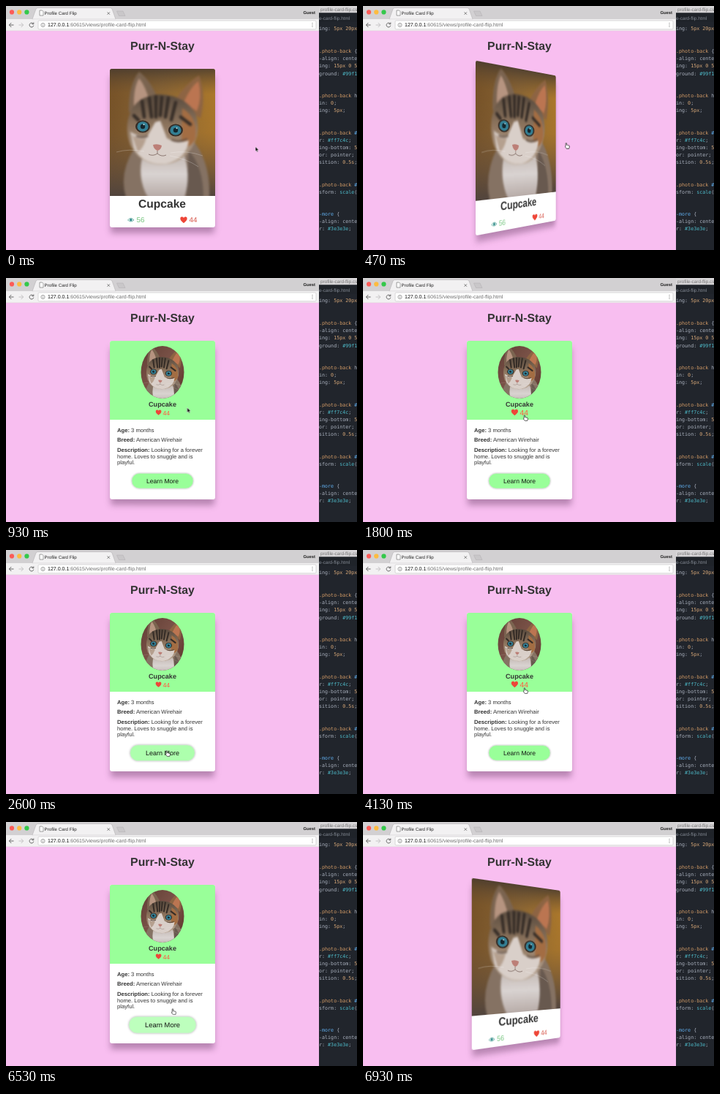
Animation, 480 px wide and 334 px high, one loop 6.99 s. Source, as an HTML page:

```html
<!DOCTYPE html>
<html lang="en">
<head>
<meta charset="utf-8">
<title>Profile Card Flip</title>
<style>
  :root { --loop: 6990ms; }
  html, body { margin: 0; width: 100%; height: 100%; overflow: hidden; }
  body { position: relative; background: #f8bef0; font-family: "Liberation Sans", sans-serif; }
  svg { position: absolute; display: block; text-rendering: geometricPrecision; }
  svg text { white-space: pre; }
  .window { left: 0; top: 0; }
  .code { font: 6.7px "DejaVu Sans Mono", monospace; fill: #abb2bf; }
  .sel { fill: #d19a66; }
  .val { fill: #d8a878; }
  .fn { fill: #4fbccb; }
  .id { fill: #61afef; }

  .scene { position: absolute; left: 142px; top: 86px; width: 144px; height: 217px; perspective: 500px; }
  .card { position: absolute; inset: 0; transform-style: preserve-3d; animation: flip var(--loop) infinite; }
  .face {
    inset: 0; border-radius: 3px; background: #fff; overflow: hidden; backface-visibility: hidden;
    box-shadow: 0 9px 8px -1px rgba(80, 40, 75, .38);
  }
  .back { transform: rotateY(180deg); }
  .soft { filter: blur(1.5px); }
  .name { font-weight: 700; text-anchor: middle; fill: #333; }
  .about { font-size: 7.65px; fill: #333; }
  .about tspan { font-weight: 700; }
  .likes, .button { transform-box: fill-box; transform-origin: center; }
  .likes { fill: #ff5c42; animation: likes var(--loop) infinite; }
  .button { fill: #99ff99; animation: button var(--loop) infinite; }
  .button rect { stroke: #d5e4d6; stroke-width: .6; filter: drop-shadow(0 .8px 1.3px rgba(0, 0, 0, .28)); }
  .button text { font-size: 8.6px; text-anchor: middle; fill: #111; }

  .pointer { left: 0; top: 0; overflow: hidden; animation: move var(--loop) linear infinite; }
  .pointer g { animation: shape var(--loop) step-end infinite; }

  /* the closing turn is cut short by the loop, so its curve is the first part of "ease" */
  @keyframes flip {
    0%, 5.28% { transform: rotateY(0); animation-timing-function: ease; }
    13.86% { transform: rotateY(180deg); }
    94.76% { transform: rotateY(180deg); animation-timing-function: cubic-bezier(.322, .088, .391, .729); }
    100% { transform: rotateY(19.4deg); }
  }
  @keyframes likes {
    0%, 17.88%, 39.34%, 52.2%, 71.2%, 100% { transform: scale(1); }
    25.04%, 32.19%, 59.1%, 64.1% { transform: scale(1.2); }
  }
  @keyframes button {
    0%, 35.05%, 50.36%, 73.39%, 100% { transform: scale(1); fill: #99ff99; }
    42.2%, 43.2%, 80.54%, 92.85% { transform: scale(1.1); fill: #c0ffc0; }
  }
  @keyframes move {
    0%, 1% { transform: translate(340.5px, 192px); }
    5.28% { transform: translate(284px, 189px); }
    9.59% { transform: translate(260px, 182px); }
    13.3% { transform: translate(247.5px, 177px); }
    17.9%, 32.2% { transform: translate(219px, 187px); }
    35% { transform: translate(217px, 266px); }
    37.2%, 42.5% { transform: translate(218px, 274px); }
    48% { transform: translate(236px, 215px); }
    52.2% { transform: translate(219px, 190px); }
    59.1%, 64.1% { transform: translate(219px, 188px); }
    73.3%, 92.4% { transform: translate(225.5px, 272px); }
    93.42% { transform: translate(225.5px, 255px); }
    94.8% { transform: translate(286px, 270px); }
    97.5%, 100% { transform: translate(326px, 340px); }
  }
  @keyframes shape {
    0%, 11.5%, 32.6%, 44%, 64.5%, 94.8% { transform: none; }
    5.28%, 17.5%, 34.6%, 51.8%, 72.9% { transform: translateX(-20px); }
  }
</style>
</head>
<body>

<svg class="window" width="480" height="334" viewBox="0 0 480 334">
  <defs>
    <linearGradient id="wall" x2="1" y2=".15">
      <stop stop-color="#755127"/><stop offset=".5" stop-color="#8a6534"/><stop offset="1" stop-color="#aa772b"/>
    </linearGradient>
    <linearGradient id="shade" x2="0" y2="1">
      <stop stop-color="#45392f" stop-opacity=".8"/><stop offset=".2" stop-color="#6b4f30" stop-opacity="0"/>
      <stop offset=".5" stop-color="#6b5139" stop-opacity=".1"/><stop offset="1" stop-color="#51443d"/>
    </linearGradient>
    <linearGradient id="coat" x2="0" y2="1">
      <stop stop-color="#57493d"/><stop offset=".45" stop-color="#8d745d"/><stop offset="1" stop-color="#b9a694"/>
    </linearGradient>
    <linearGradient id="chest" x2="0" y2="1">
      <stop stop-color="#bdb1ab"/><stop offset=".5" stop-color="#d9d3d1"/><stop offset="1" stop-color="#b6aaa6"/>
    </linearGradient>
    <linearGradient id="rug" x2="1" y2="1">
      <stop stop-color="#5e3c34"/><stop offset=".5" stop-color="#7d5449"/><stop offset="1" stop-color="#583128"/>
    </linearGradient>
    <path id="heart" d="M5 9C2 6.5 .3 5 .3 2.9A2.45 2.45 0 0 1 5 1.8A2.45 2.45 0 0 1 9.7 2.9C9.7 5 8 6.5 5 9Z" fill="#ee4638"/>
    <g id="eye">
      <ellipse rx="10" ry="8.6" fill="#352d27"/>
      <ellipse rx="7.6" ry="6.8" fill="#337f94"/>
      <circle r="3.2" fill="#14252c"/>
      <circle cx="1.5" cy="-2.7" r="1" fill="#c2dde2"/>
    </g>
    <g id="cat">
      <g class="soft">
        <path d="M34 108Q12 142 22 176H136Q138 126 112 96Z" fill="#857263"/>
        <path d="M108 112Q128 134 128 176H104Z" fill="#68594f"/>
        <path d="M46 114Q36 148 52 176H102Q112 146 100 112Z" fill="url(#chest)"/>
        <path d="M26 60Q25 22 40 4Q56 16 66 42Z" fill="#7b6450"/>
        <path d="M33 52Q32 26 40 13Q49 24 54 44Z" fill="#b69480"/>
        <path d="M90 42Q104 20 122 9Q132 36 124 68Z" fill="#8d6443"/>
        <path d="M101 46Q110 25 121 17Q127 38 119 58Z" fill="#bb7551"/>
        <path d="M27 62Q36 37 68 35Q104 36 118 63Q126 91 108 114Q92 132 67 131Q40 129 28 104Q20 82 27 62Z" fill="url(#coat)"/>
        <path d="M99 54Q121 67 117 96Q108 112 98 103Z" fill="#a36d43"/>
        <path d="M28 86Q40 94 52 91L62 73L69 71L78 95Q92 103 108 98Q105 123 77 130Q47 133 33 109Z" fill="#d9cfc9"/>
        <path d="M30 90Q40 98 50 95Q44 112 38 114Z" fill="#b5a08f"/>
        <path d="M44 44L47 66M54 40L57 66M63 38L63 66M71 39L69 64M80 40L76 66M90 46L84 70M33 64L39 70M97 66L110 76" stroke="#362d27" stroke-width="4.6" stroke-linecap="round"/>
        <path d="M36 92Q44 95 52 92M84 97Q94 102 106 96" fill="none" stroke="#624e40" stroke-width="2.4"/>
      </g>
      <use href="#eye" x="45" y="79"/>
      <use href="#eye" x="90" y="84"/>
      <path d="M59 104Q65 102 71 105Q70 111 65 112Q60 110 59 104Z" fill="#bc7f77"/>
      <path d="M65 112V116Q59 120 53 117M65 116Q71 121 77 118" fill="none" stroke="#85716a" stroke-width=".9"/>
      <path d="M47 113Q26 109 9 114M83 115Q105 111 127 119M82 119Q105 123 121 134" fill="none" stroke="#fff" stroke-opacity=".4" stroke-width=".6"/>
    </g>
  </defs>

  <rect width="428" height="18" fill="#d2d0d2"/>
  <rect y="18" width="428" height="16" fill="#f2f1f2"/>
  <path d="M36 18L41 4Q42 2.5 44 2.5H142Q144 2.5 145 4L150 18Z" fill="#f2f1f2" stroke="#b5b3b5" stroke-width=".6"/>
  <path d="M36.5 18.2H149.5" stroke="#f2f1f2"/>
  <path d="M0 33.8H428" stroke="#dccdd9" stroke-width=".5"/>
  <circle cx="8" cy="8.4" r="3.1" fill="#fc5b57"/>
  <circle cx="18.2" cy="8.4" r="3.1" fill="#fdbc40"/>
  <circle cx="28.4" cy="8.4" r="3.1" fill="#34c84a"/>
  <path d="M46 6H49.5L51 7.7V13H46Z" fill="#fff" stroke="#777" stroke-width=".7"/>
  <path d="M138.5 8.3L142 11.8M142 8.3L138.5 11.8" stroke="#666" stroke-width=".8"/>
  <path d="M151.5 7H160L163 13.5H154.5Z" fill="#c9c7c9" stroke="#b5b3b5" stroke-width=".6"/>
  <g fill="#222">
    <text x="52.6" y="12.2" font-size="6.15">Profile Card Flip</text>
    <text x="406.5" y="11" font-size="5.8" font-weight="700">Guest</text>
  </g>
  <g fill="none" stroke="#666" stroke-width="1">
    <path d="M10.5 26H4.5M7.3 23L4.3 26L7.3 29"/>
    <path d="M17.5 26H23.5M20.7 23L23.7 26L20.7 29" stroke="#c4c2c4"/>
    <path d="M37.2 24.2A2.9 2.9 0 1 0 37.8 26.7M37.8 22.5V24.8H35.4"/>
  </g>
  <rect x="44" y="20" width="380" height="11.8" rx="1.5" fill="#fff" stroke="#c9c7c9" stroke-width=".7"/>
  <circle cx="50.5" cy="26" r="2.6" fill="none" stroke="#777" stroke-width=".7"/>
  <path d="M50.5 25.6V27.6M50.5 24.2V24.9" stroke="#777" stroke-width=".7"/>
  <text x="57" y="28.4" font-size="7.05" fill="#111">127.0.0.1<tspan fill="#707070">:60615/views/profile-card-flip.html</tspan></text>
  <path d="M419 23.5V29" stroke="#666" stroke-width="1.2" stroke-linecap="round" stroke-dasharray="0 2.3"/>

  <text class="name" x="214" y="59.5" font-size="15.8">Purr-N-Stay</text>

  <rect x="428" width="52" height="334" fill="#21252c"/>
  <rect x="428" width="52" height="9.5" fill="#d6d4d6"/>
  <rect x="428" y="9.5" width="52" height="12" fill="#1f2329"/>
  <text x="430" y="7" font-size="6.4" fill="#777">profile-card-flip.css</text>
  <text x="428" y="18.8" font-size="6.4" fill="#858b96">e-card-flip.html</text>
  <g class="code">
    <text x="428" y="33">ing: <tspan class="val">5px 20px</tspan></text>
    <text x="428" y="64"><tspan class="sel">.photo-back</tspan> {</text>
    <text x="428" y="74">-align: center;</text>
    <text x="428" y="84.3">ing: <tspan class="val">15px 0 5px</tspan></text>
    <text x="428" y="94.5">ground: <tspan class="fn">#99f199</tspan></text>
    <text x="428" y="125"><tspan class="sel">.photo-back</tspan> h</text>
    <text x="428" y="135">in: <tspan class="val">0</tspan>;</text>
    <text x="428" y="145">ing: <tspan class="val">5px</tspan>;</text>
    <text x="428" y="175.5"><tspan class="sel">.photo-back</tspan> <tspan class="id">#</tspan></text>
    <text x="428" y="185.5">r: <tspan class="fn">#ff7c4c</tspan>;</text>
    <text x="428" y="195.7">ing-bottom: <tspan class="val">5</tspan></text>
    <text x="428" y="205.8">or: pointer;</text>
    <text x="428" y="216">sition: <tspan class="val">0.5s</tspan>;</text>
    <text x="428" y="246.5"><tspan class="sel">.photo-back</tspan> <tspan class="id">#</tspan></text>
    <text x="428" y="256.5">sform: <tspan class="fn">scale</tspan>(</text>
    <text x="428" y="287"><tspan class="id">-more</tspan> {</text>
    <text x="428" y="297">-align: center</text>
    <text x="428" y="307">r: <tspan class="fn">#3e3e3e</tspan>;</text>
  </g>
</svg>

<div class="scene">
  <div class="card">
    <svg class="face" width="144" height="217" viewBox="0 0 144 217">
      <svg width="144" height="174">
        <rect width="144" height="174" fill="url(#wall)"/>
        <rect width="144" height="174" fill="url(#shade)"/>
        <use href="#cat"/>
      </svg>
      <text class="name" x="71.5" y="190.3" font-size="15.6">Cupcake</text>
      <path d="M24.5 207Q28.8 202 33 207Q28.8 211 24.5 207Z" fill="#e8f5f3" stroke="#5aa79b" stroke-width=".8"/>
      <circle cx="28.8" cy="206.8" r="1.7" fill="#348d8d"/>
      <text x="36.5" y="210.3" font-size="9.8" fill="#74c47d">56</text>
      <use href="#heart" x="96" y="202.2"/>
      <text x="108.5" y="210.3" font-size="9.8" fill="#d65549">44</text>
    </svg>

    <svg class="face back" width="144" height="217" viewBox="0 0 144 217">
      <clipPath id="oval"><ellipse cx="72" cy="43" rx="29.5" ry="36"/></clipPath>
      <rect width="144" height="108" fill="#99ff99"/>
      <g clip-path="url(#oval)">
        <rect x="42" y="6" width="60" height="74" fill="url(#rug)"/>
        <use href="#cat" transform="translate(39 6) scale(.46)"/>
      </g>
      <text class="name" x="72" y="90" font-size="9.1">Cupcake</text>
      <g class="likes">
        <use href="#heart" transform="translate(62.5 94.3) scale(.82)"/>
        <text x="72.5" y="101.5" font-size="8.6">44</text>
      </g>
      <g class="about">
        <text x="10" y="125"><tspan>Age:</tspan> 3 months</text>
        <text x="10" y="138"><tspan>Breed:</tspan> American Wirehair</text>
        <text x="10" y="152"><tspan>Description:</tspan> Looking for a forever</text>
        <text x="10" y="160.5">home. Loves to snuggle and is</text>
        <text x="10" y="169">playful.</text>
      </g>
      <g class="button">
        <rect x="30" y="181.5" width="84" height="20.5" rx="10.2"/>
        <text x="72" y="194.8">Learn More</text>
      </g>
    </svg>
  </div>
</div>

<svg class="pointer" width="12" height="12" viewBox="0 0 12 12">
  <g stroke-linejoin="round">
    <path d="M.5 .5V7L2 5.7L3 8L4.1 7.5L3.1 5.3H5Z" fill="#111" stroke="#fff" stroke-width=".4"/>
    <path d="M21.2 4.6V1Q21.9 .1 22.6 1V3.5L26 4.4Q26.8 4.8 26.5 6L25.8 8.4H22.3L20.2 5.8Q20 4.7 21.2 5.3Z" fill="#fff" stroke="#222" stroke-width=".7"/>
  </g>
</svg>

</body>
</html>
```
